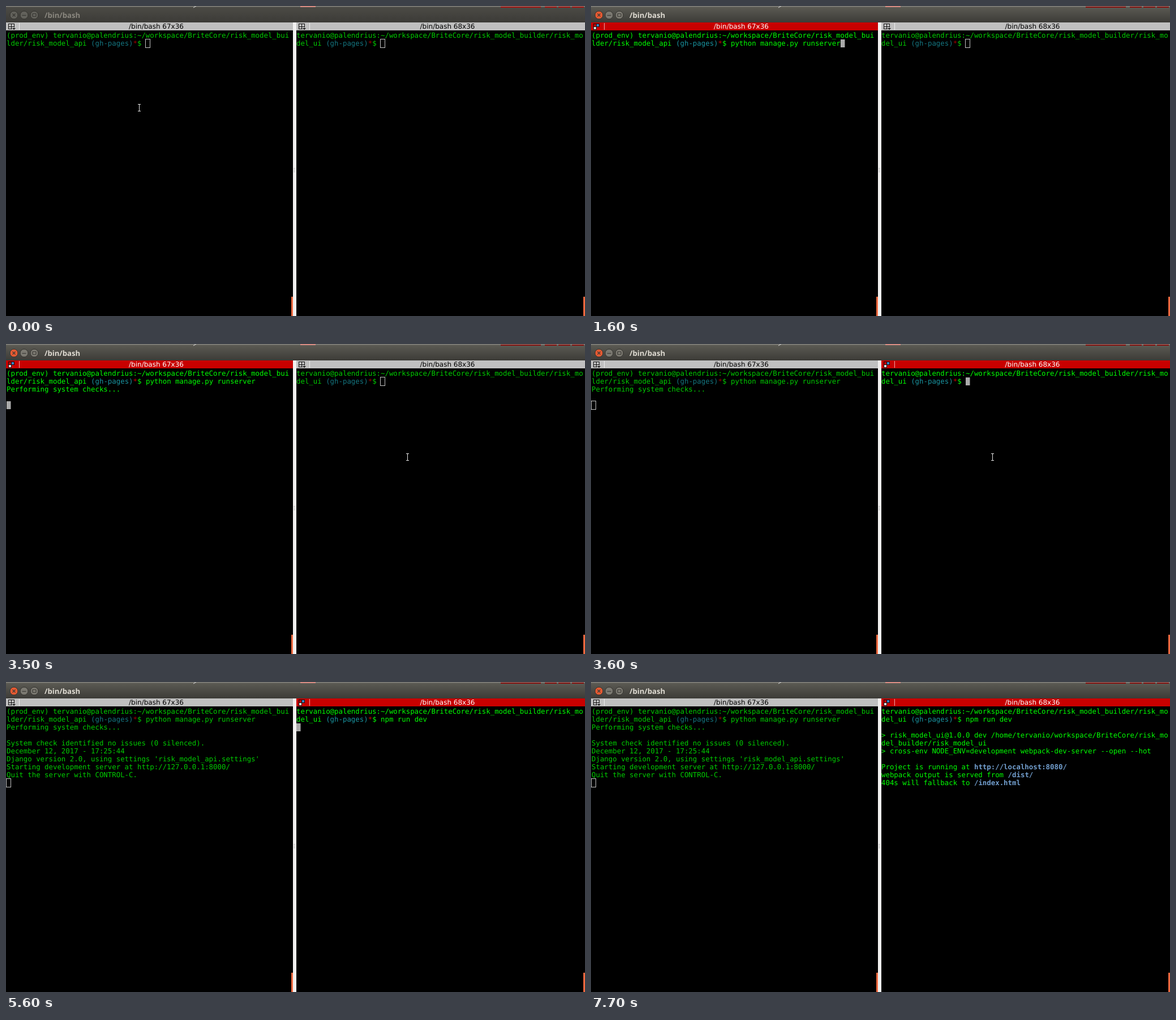
Write an HTML page with a canvas that moves like this. It is 1023 px wide and 547 px high and loops after 8 s.

```html
<!DOCTYPE html>
<html lang="en">
<head>
<meta charset="utf-8">
<title>Two terminals</title>
<style>
html, body { margin: 0; width: 100%; height: 100%; overflow: hidden; background: #000; }
canvas { display: block; }
</style>
</head>
<body>
<canvas id="stage" width="1023" height="547"></canvas>
<script>
const ctx = document.getElementById('stage').getContext('2d');
const LOOP = 8000, CELL = 7.453, ROW = 14, TOP = 45;
const MONO = '12.38px "DejaVu Sans Mono", monospace';
const USER = 'tervanio', HOST = 'palendrius';
const PROJECT = '/workspace/BriteCore/risk_model_builder/';

const rect = (color, x, y, w, h) => {
  ctx.fillStyle = color;
  ctx.fillRect(x, y, w, h);
};

const lines = (color, points, width = 1) => {
  ctx.strokeStyle = color;
  ctx.lineWidth = width;
  ctx.beginPath();
  for (const [x1, y1, x2, y2] of points) {
    ctx.moveTo(x1, y1);
    ctx.lineTo(x2, y2);
  }
  ctx.stroke();
};

const label = (text, font, color, x, y, align = 'left') => {
  ctx.font = font;
  ctx.fillStyle = color;
  ctx.textAlign = align;
  ctx.fillText(text, x, y);
};

// Unfocused panes show every text colour at 80 %.
const COLORS = { green: [0, 255, 0], cyan: [25, 148, 160], red: [204, 0, 0], blue: [114, 159, 207] };
const shade = (name, lit) => `rgb(${COLORS[name].map(v => Math.round(v * (lit ? 1 : 0.8)))})`;

function print(pane, row, ...runs) {
  let col = 0;
  for (const [text, color = 'green'] of runs) {
    const font = (color === 'blue' ? 'bold ' : '') + MONO;
    label(text, font, shade(color, pane.lit), pane.x + col * CELL, TOP + row * ROW + 11);
    col += text.length;
  }
}

function prompt(pane, venv, dir, command) {
  const path = `${venv}${USER}@${HOST}:~${PROJECT}${dir} `;
  print(pane, 0, [path.slice(0, pane.cols)]);
  print(pane, 1, [path.slice(pane.cols)], ['(gh-pages)', 'cyan'], ['*', 'red'], ['$ ' + command]);
}

function caret(pane, row, col) {
  const x = pane.x + col * CELL, y = TOP + row * ROW;
  if (pane.lit) return rect('#aaa', Math.round(x), y, 7.5, ROW);
  ctx.strokeStyle = '#c4c4c4';
  ctx.lineWidth = 1;
  ctx.strokeRect(Math.round(x) - 0.5, y - 0.5, 8, 15);
}

function button(x, fill, ink, glyph) {
  ctx.beginPath();
  ctx.arc(x, 16, 7, 0, 7);
  ctx.fillStyle = fill;
  ctx.fill();
  ctx.strokeStyle = '#33322e';
  ctx.lineWidth = 1;
  ctx.stroke();
  lines(ink, glyph, 1.2);
}

function windowBar(focused) {
  const bar = ctx.createLinearGradient(0, 2, 0, 29);
  bar.addColorStop(0, focused ? '#5b5a53' : '#4b4a45');
  bar.addColorStop(1, '#3c3b37');
  rect(bar, 0, 0, 1023, 29);

  rect('#85847f', 0, 0, 1023, 1.5);
  rect('#d98d84', 520, 0, 27, 2);
  for (const [x, w] of [[874, 71], [952, 21], [976, 21], [1000, 21]]) {
    rect(focused ? '#87100e' : '#a51412', x, 1, w, 2);
  }
  lines('#ddd', [[331, 3, 336, 0]]);

  const ink = focused ? '#3b3a36' : '#373632', grey = focused ? '#7b7971' : '#62615b';
  button(14, focused ? '#e65a32' : grey, ink, [[11.5, 13.5, 16.5, 18.5], [16.5, 13.5, 11.5, 18.5]]);
  button(32, grey, ink, [[28.5, 16.5, 35.5, 16.5]]);
  button(50, grey, ink, [[47, 13.5, 53, 13.5], [53, 13.5, 53, 18.5], [53, 18.5, 47, 18.5], [47, 18.5, 47, 13.5]]);
  label('/bin/bash', 'bold 13.1px "Open Sans", sans-serif', focused ? '#dfdbd2' : '#8a877f', 68, 21);
}

function paneBar({ left, right, lit, cols }) {
  rect(lit ? '#c80000' : '#c0c0c0', left, 29, right - left, 14);
  const x = left + 4;
  if (lit) {
    rect('#111', x, 31, 11, 11);
    rect('#c80000', x + 1, 32, 4, 4);
    rect('#3b82c4', x + 6, 32, 4, 4);
    rect('#ddd', x + 1, 37, 4, 4);
    rect('#c80000', x + 6, 37, 5, 5);
  } else {
    ctx.strokeStyle = '#111';
    ctx.lineWidth = 1;
    ctx.strokeRect(x + 0.5, 31.5, 10, 9);
    lines('#111', [[x + 5.5, 31, x + 5.5, 41], [x, 36.5, x + 11, 36.5]]);
    rect('#c0c0c0', x + 7, 38, 6, 4);
    ctx.fillStyle = '#111';
    ctx.beginPath();
    ctx.moveTo(x + 7, 39);
    ctx.lineTo(x + 13, 39);
    ctx.lineTo(x + 10, 42);
    ctx.fill();
  }
  rect(lit ? '#eaa' : '#eee', left + 23, 30, 1, 12);
  label(`/bin/bash ${cols}x36`, '12px "DejaVu Sans", sans-serif', lit ? '#fff' : '#000',
    (left + 24 + right) / 2, 40, 'center');
}

function leftPane(t, pane) {
  const command = t < 1200 ? '' : t < 1600 ? 'clear' : 'python manage.py runserver';
  prompt(pane, '(prod_env) ', 'risk_model_api', command);
  if (t < 2100) return caret(pane, 1, 33 + command.length);
  if (t < 3500) {
    if (t < 2700 || t >= 3300) caret(pane, 2, 0);
    return;
  }
  print(pane, 2, ['Performing system checks...']);
  if (t < 3800) return caret(pane, 4, 0);
  [
    'System check identified no issues (0 silenced).',
    'December 12, 2017 - 17:25:44',
    "Django version 2.0, using settings 'risk_model_api.settings'",
    'Starting development server at http://127.0.0.1:8000/',
    'Quit the server with CONTROL-C.'
  ].forEach((text, i) => print(pane, 4 + i, [text]));
  caret(pane, 9, 0);
}

function rightPane(t, pane) {
  const command = t < 4700 ? '' : t < 5100 ? 'clear' : 'npm run dev';
  prompt(pane, '', 'risk_model_ui', command);
  if (t < 5600) {
    if (t < 4200 || t >= 4700) caret(pane, 1, 20 + command.length);
    return;
  }
  if (t < 6200) return caret(pane, 2, 0);
  if (t < 6300) return;
  const script = `> risk_model_ui@1.0.0 dev /home/${USER}${PROJECT}risk_model_ui`;
  print(pane, 3, [script.slice(0, pane.cols)]);
  print(pane, 4, [script.slice(pane.cols)]);
  print(pane, 5, ['> cross-env NODE_ENV=development webpack-dev-server --open --hot']);
  if (t >= 6900 && t < 7500) caret(pane, 7, 0);
  if (t < 7700) return;
  print(pane, 7, ['Project is running at '], ['http://localhost:8080/', 'blue']);
  print(pane, 8, ['webpack output is served from '], ['/dist/', 'blue']);
  print(pane, 9, ['404s will fallback to '], ['/index.html', 'blue']);
}

// The pointer hides while typing and swings across in 100 ms steps.
function pointer(t) {
  if ((t >= 1100 && t < 2300) || t >= 4700) return;
  let x = 235, y = 179;
  if (t >= 2300) {
    const p = Math.min(1, (Math.floor(t / 100) - 22) / 5);
    x = Math.round(235 + 474 * p * (1.3 - 0.3 * p));
    y = Math.round(179 + 20 * p + 132 * p * (1 - p));
  }
  lines('#e4e4e4', [
    [x + 0.5, y - 6, x + 0.5, y + 6],
    [x - 2, y - 5.5, x + 3, y - 5.5],
    [x - 2, y + 6.5, x + 3, y + 6.5]
  ]);
}

function draw(now) {
  const t = now % LOOP;
  const panes = [
    { x: 1, left: 0, right: 507, cols: 67, lit: t >= 800 && t < 3600, fill: leftPane },
    { x: 513, left: 513, right: 1023, cols: 68, lit: t >= 3600, fill: rightPane }
  ];
  ctx.textRendering = 'geometricPrecision';
  rect('#000', 0, 0, 1023, 547);
  windowBar(t >= 800);
  rect('#f2f1f0', 507, 29, 6, 518);
  for (let y = 286; y < 293; y += 3) rect('#bbb', 508, y, 3, 1);
  for (const pane of panes) {
    paneBar(pane);
    pane.fill(t, pane);
    rect('#f0693f', pane.right - 3, 513, 3, 34);
  }
  pointer(t);
  requestAnimationFrame(draw);
}
requestAnimationFrame(draw);
</script>
</body>
</html>
```
